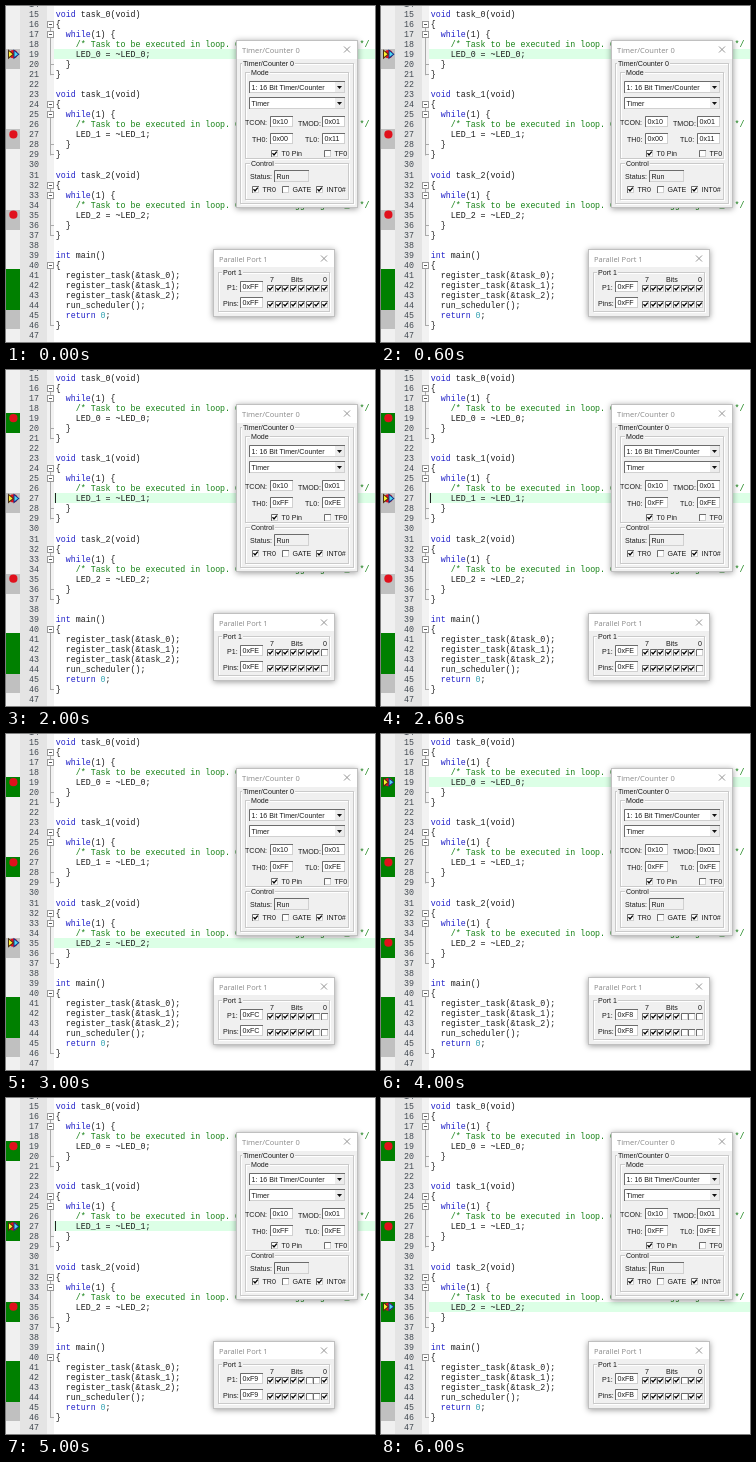
An HTML page with a canvas that plays this animation: 369x336 px, repeating every 7 s.

```html
<!DOCTYPE html>
<html lang="en">
<meta charset="utf-8">
<title>Scheduler debug session</title>
<style>
  html, body { margin: 0; overflow: hidden; background: #fff; }
  canvas { display: block; }
</style>
<canvas id="stage" width="369" height="336"></canvas>
<script>
const ctx = document.getElementById('stage').getContext('2d');
const MONO = '8.3px "Liberation Mono", monospace';
const SANS = '7.1px "Liberation Sans", sans-serif';
const TITLE = '7.5px "Open Sans", sans-serif';
const FIRST = 14, PITCH = 10.03, CODE_X = 49.8, CHAR = 4.98;

const task = n => [
  `void task_${n}(void)`, '{', '  while(1) {',
  `    /* Task to be executed in loop. Codes for toggling LED_${n} */`,
  `    LED_${n} = ~LED_${n};`, '  }', '}', ''];
const code = ['', ...task(0), ...task(1), ...task(2),
  'int main()', '{', '  register_task(&task_0);', '  register_task(&task_1);',
  '  register_task(&task_2);', '  run_scheduler();', '  return 0;', '}', ''];
const taskLines = [19, 27, 35];

// One step per second: running task, timer registers, port value, tasks already covered.
const steps = [
  { at: 0, timer: ['00', '11'], port: 0xFF, covered: 0 },
  { at: 0, timer: ['00', '14'], port: 0xFE, covered: 1 },
  { at: 1, timer: ['FF', 'FE'], port: 0xFE, covered: 1 },
  { at: 2, timer: ['FF', 'FE'], port: 0xFC, covered: 2 },
  { at: 0, timer: ['FF', 'FE'], port: 0xF8, covered: 3 },
  { at: 1, timer: ['FF', 'FE'], port: 0xF9, covered: 3 },
  { at: 2, timer: ['FF', 'FE'], port: 0xFB, covered: 3 }];

const rowY = line => (line - FIRST) * PITCH - 2;

function rect(x, y, w, h, color) {
  ctx.fillStyle = color;
  ctx.fillRect(x, y, w, h);
}

function frame(x, y, w, h, color) {
  ctx.strokeStyle = color;
  ctx.lineWidth = 1;
  ctx.strokeRect(x + .5, y + .5, w - 1, h - 1);
}

function text(str, x, y, color = '#1c1c1c', font = SANS) {
  ctx.font = font;
  ctx.fillStyle = color;
  ctx.fillText(str, x, y + 2.5);
}

function path(points, color, width) {
  ctx.beginPath();
  for (let i = 0; i < points.length; i += 2) ctx.lineTo(points[i], points[i + 1]);
  if (width) {
    ctx.strokeStyle = color;
    ctx.lineWidth = width;
    ctx.stroke();
  } else {
    ctx.fillStyle = color;
    ctx.fill();
  }
}

function sunken(x, y, w, h, fill = '#fff') {
  rect(x, y, w, h, fill);
  frame(x, y, w, h, '#d0d0d0');
  path([x + .5, y + h, x + .5, y + .5, x + w, y + .5], '#6c6c6c', 1);
}

function foldMark(str, y) {
  if (str.endsWith('{')) {
    rect(41, y - 3, 7, 7, '#fff');
    frame(41, y - 3, 7, 7, '#999');
    rect(43, y, 3, 1, '#555');
  } else if (str.trim() === '}') {
    rect(44, y, 4, 1, '#aaa');
  }
}

function arrow(x, y, edge, fill) {
  path([x, y - 5, x + 6, y, x, y + 5], edge);
  path([x + 1, y - 2.8, x + 4.5, y, x + 1, y + 2.8], fill);
}

function editor({ at, covered }) {
  rect(0, 0, 369, 336, '#fff');
  rect(0, 0, 14, 336, '#f0f0f0');
  rect(14, 0, 27, 336, '#e4e4e4');
  rect(41, 0, 7, 336, '#f2f2f2');
  taskLines.forEach((line, i) =>
    rect(0, Math.round(rowY(line) - 5), 14, 20, i < covered ? '#008000' : '#c0c0c0'));
  rect(0, 263, 14, 41, '#008000');
  rect(0, 304, 14, 19, '#c0c0c0');

  const activeY = rowY(taskLines[at]);
  rect(48, Math.round(activeY - 5), 321, 10, '#dcffe6');
  if (at === 1) rect(49, 123, 1, 10, '#222');

  for (const start of [16, 24, 32, 40]) {
    const end = start === 40 ? 46 : start + 5;
    rect(44, rowY(start), 1, rowY(end) - rowY(start) + 1, '#aaa');
  }
  code.forEach((str, i) => {
    const y = Math.round(rowY(FIRST + i));
    text(FIRST + i, 23, y, '#404850', MONO);
    foldMark(str, y);
    const tokens = /\/\*.*\*\/|\b(?:void|while|int|return)\b|\b\d\b|[^\s\d]\w*|\w+/g;
    for (const { 0: word, index } of str.matchAll(tokens)) {
      const color = word.startsWith('/*') ? '#168216'
        : /^(void|while|int|return)$/.test(word) ? '#2020c8'
        : /^\d$/.test(word) ? '#30a0b0' : '#1c1c1c';
      text(word, CODE_X + index * CHAR, y, color, MONO);
    }
  });

  for (const line of taskLines) {
    ctx.beginPath();
    ctx.arc(7.4, rowY(line), 4.1, 0, 7);
    ctx.fillStyle = '#e0101c';
    ctx.fill();
  }
  arrow(7.5, activeY, '#10308c', '#50d8f0');
  arrow(2, activeY, '#4a3010', '#ffee30');
}

function dialog(title, x, y, w, h, barH) {
  ctx.shadowColor = 'rgba(0,0,0,.4)';
  ctx.shadowBlur = 6;
  ctx.shadowOffsetY = 1;
  rect(x, y, w, h, '#f0f0f0');
  ctx.shadowColor = 'transparent';
  rect(x, y, w, barH, '#fff');
  frame(x, y, w, h, '#c0c0c0');
  text(title, x + 6, y + 10, '#888', TITLE);
  const cx = x + w - 11, cy = y + 9.5;
  path([cx - 3, cy - 3, cx + 3, cy + 3], '#888', .9);
  path([cx + 3, cy - 3, cx - 3, cy + 3], '#888', .9);
}

function group(label, x, y, w, h, labelX) {
  frame(x + 1, y + 1, w, h, '#fff');
  frame(x, y, w, h, '#cacaca');
  ctx.font = SANS;
  rect(labelX - 1, y - 1, ctx.measureText(label).width + 2, 4, '#f0f0f0');
  text(label, labelX, y);
}

function field(str, x, y, w = 23, h = 11, fill = '#fff') {
  sunken(x, y, w, h, fill);
  text(str, x + 2.5, y + h / 2);
}

function combo(str, y) {
  field(str, 243, y, 96, 12);
  rect(329, y + 1, 9, 10, '#ececec');
  path([331, y + 5, 336, y + 5, 333.5, y + 8], '#111');
}

function check(x, y, on, label = '') {
  sunken(x, y, 7, 7);
  if (on) path([x + 1.5, y + 3.2, x + 3, y + 5, x + 5.8, y + 1.6], '#000', 1.3);
  text(label, x + 10.5, y + 3.5);
}

function timerDialog([high, low]) {
  dialog('Timer/Counter 0', 230, 34, 122, 168, 19);
  group('Timer/Counter 0', 234, 57, 114, 141, 237);
  group('Mode', 239, 66, 104, 87, 245);
  combo('1: 16 Bit Timer/Counter', 75);
  combo('Timer', 91);
  text('TCON:', 239, 116);
  field('0x10', 264, 110);
  text('TMOD:', 292, 117);
  field('0x01', 316, 110);
  text('TH0:', 246, 133);
  field('0x' + high, 264, 127);
  text('TL0:', 299, 133);
  field('0x' + low, 316, 127);
  check(265, 144, true, 'T0 Pin');
  check(318, 144, false, 'TF0');
  group('Control', 239, 157, 104, 37, 245);
  text('Status:', 244, 170);
  field('Run', 268, 164, 35, 12, '#f0f0f0');
  check(246, 180, true, 'TR0');
  check(276, 180, false, 'GATE');
  check(310, 180, true, 'INT0#');
}

function portDialog(port) {
  const hex = '0x' + port.toString(16).toUpperCase();
  dialog('Parallel Port 1', 207, 243, 122, 68, 18);
  group('Port 1', 212, 266, 112, 40, 217);
  text('7', 264, 273);
  text('Bits', 285, 273);
  text('0', 317, 273);
  [['P1:', 221, 276], ['Pins:', 217, 292]].forEach(([label, x, y]) => {
    text(label, x, y + 5);
    field(hex, 234, y - 1);
    for (let bit = 7; bit >= 0; bit--)
      check(Math.round(261 + (7 - bit) * 7.7), y + 3, port >> bit & 1);
  });
}

function draw() {
  const step = steps[Math.floor(performance.now() / 1000) % steps.length];
  editor(step);
  timerDialog(step.timer);
  portDialog(step.port);
  requestAnimationFrame(draw);
}
draw();
</script>
</html>
```
